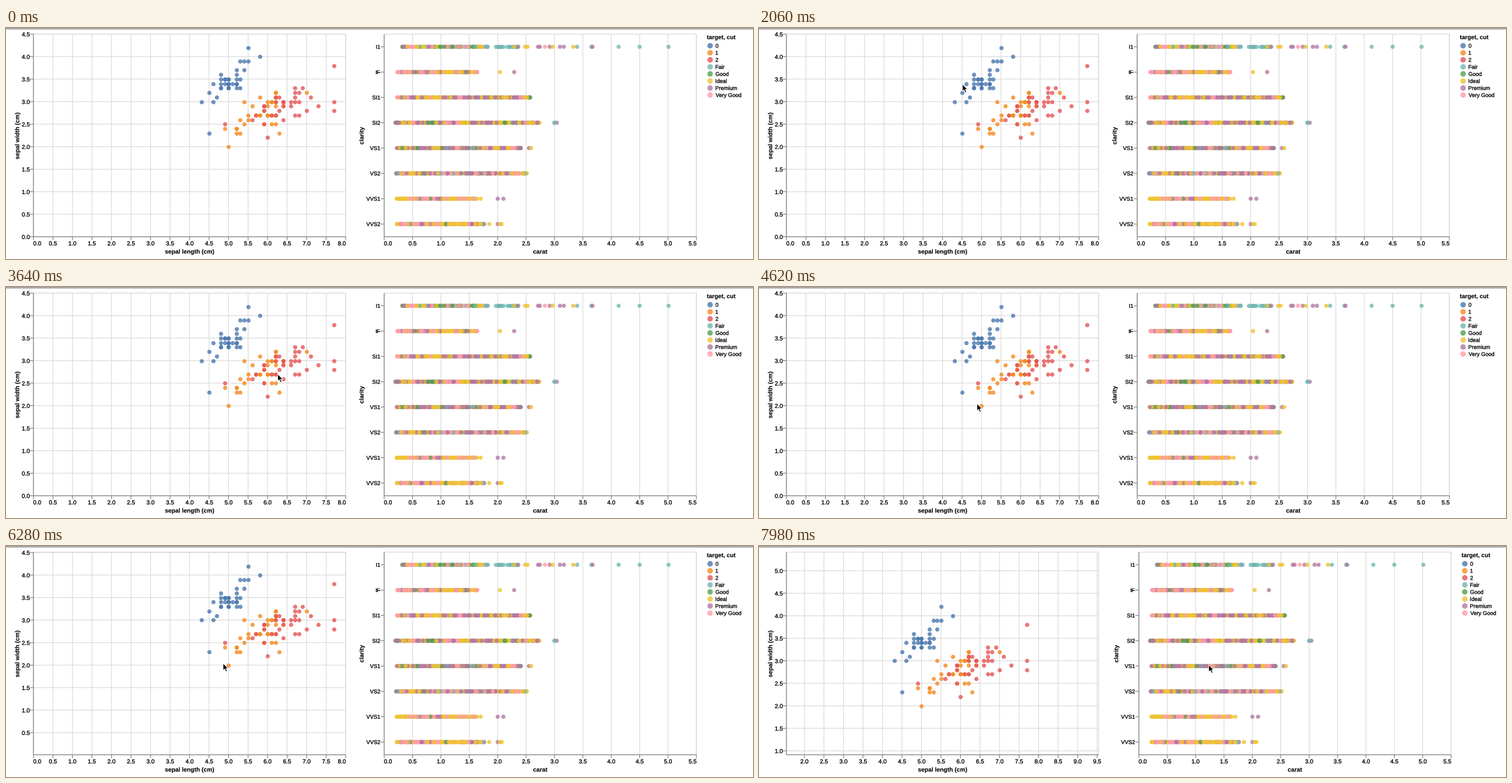
A matplotlib script for the animation above (8000 ms loop, 1280x397 px).

```python
import numpy as np
import matplotlib.pyplot as plt
from matplotlib.animation import FuncAnimation
from matplotlib.collections import LineCollection
from matplotlib.patches import PathPatch, Polygon, Rectangle
from matplotlib.textpath import TextPath
from matplotlib.transforms import Affine2D

W, H, DPI = 1280, 397, 100
LOOP, STEP = 8000, 40
FRAMES = LOOP // STEP
PX = 72 / DPI                      # one pixel in points
TOP, BOTTOM = 10.5, 358.7
L, R = 47, 582                     # left chart
L2, R2 = 648, 1183                 # right chart
UX, UY, UC = (R - L) / 8, (BOTTOM - TOP) / 4.5, (R2 - L2) / 5.5
GRID, AXIS = "#dcdcdc", "#888888"
ALPHA = 0.8

CUTS = {"Fair": "#72b7b2", "Good": "#54a24b", "Ideal": "#eec432",
        "Premium": "#b279a2", "Very Good": "#ff9da6"}
CUT_COLORS = list(CUTS.values())
INITIALS = {name[0]: color for name, color in CUTS.items()}

# species: colour, size, mean, spread, correlation, outer points
SPECIES = [
    ("#4a78ae", 30, (5.0, 3.38), (0.27, 0.28), 0.75,
     [(5.5, 4.2), (5.8, 4.0), (5.4, 3.9), (4.5, 2.3), (4.3, 3.0)]),
    ("#f58a1f", 34, (5.9, 2.77), (0.42, 0.25), 0.55,
     [(7.0, 3.2), (5.0, 2.0), (4.9, 2.4), (6.3, 2.3)]),
    ("#e55557", 30, (6.5, 2.95), (0.5, 0.22), 0.45,
     [(7.7, 3.8), (7.7, 2.8), (7.7, 3.0), (6.0, 2.2), (4.9, 2.5)]),
]

# share of each cut in a row, by quality
ROUGH = (0.26, 0.16, 0.18, 0.24, 0.16)
MIXED = (0.04, 0.08, 0.33, 0.33, 0.22)
PURE = (0.02, 0.05, 0.45, 0.18, 0.30)

# clarity: range, shares, lone carats and the initials of their cuts
ROWS = {
    "I1": (0.30, 1.83, ROUGH, (3.4, 3.65, 3.67, 4.13, 4.5, 5.01), "FFPFFF"),
    "IF": (0.23, 1.65, PURE, (2.04, 2.29), "IP"),
    "SI1": (0.22, 2.57, MIXED, (), ""),
    "SI2": (0.20, 2.74, MIXED, (3.04, 3.0, 3.0), "PFF"),
    "VS1": (0.22, 2.42, MIXED, (2.55, 2.59), "PI"),
    "VS2": (0.20, 2.51, MIXED, (), ""),
    "VVS1": (0.22, 1.63, PURE, (1.7, 2.0, 2.1), "IPP"),
    "VVS2": (0.22, 1.76, PURE, (1.85, 2.0, 2.07, 2.04), "IPII"),
}

# pointer moves: start and end time, where to
START = np.array([905, 352])
MOVES = [(100, 840, 730, 204), (980, 1100, 744, 232),
         (1660, 2060, 348.5, 96.5), (2100, 2380, 300, 90),
         (2480, 3640, 465.5, 149.5), (3660, 4060, 440, 124),
         (4160, 4620, 373.5, 200.5), (5000, 5100, 372, 200.7),
         (5100, 5440, 372, 201.5), (6310, 6580, 269.1, 271.4),
         (6680, 7280, 375.5, 198), (7320, 7980, 770.5, 204)]
PRESS, RELEASE = 5100, 6580


def pointer(t):
    pos, here = START + np.zeros((len(t), 2)), START
    for begin, end, x, y in MOVES:
        s = np.clip((t - begin) / (end - begin), 0, 1)
        pos += np.outer(s * s * (3 - 2 * s), (x, y) - here)
        here = np.array([x, y])
    return pos


times = np.arange(FRAMES) * STEP + STEP / 2
cursor_at = pointer(times)
pan_at = (pointer(np.clip(times, PRESS, RELEASE))
          - pointer(np.array([PRESS])))

fig = plt.figure(figsize=(W / DPI, H / DPI), dpi=DPI, facecolor="white")
ax = fig.add_axes([0, 0, 1, 1])
ax.set_xlim(0, W)
ax.set_ylim(H, 0)
ax.axis("off")

pan = Affine2D()                   # moves the left points
side = Affine2D()                  # moves the right chart and legend
still = Affine2D()


def label(s, x, y, size=10, ha="center", bold=False, rot=0, group=still):
    """Text centred vertically on y; returns its patch and its position."""
    path = TextPath((0, 0), s, size=size, prop=dict(
        family="Liberation Sans", weight="bold" if bold else "normal"))
    box = path.get_extents()
    anchor = {"left": box.x0, "right": box.x1,
              "center": (box.x0 + box.x1) / 2}[ha]
    place = Affine2D().translate(-anchor, -0.36 * size).scale(1, -1)
    pos = Affine2D().translate(x, y)
    patch = PathPatch(place.rotate_deg(rot).transform_path(path), fc="black",
                      ec="black", lw=(0.1 if bold else 0.35) * PX,
                      transform=pos + group + ax.transData, zorder=5)
    ax.add_artist(patch)
    return patch, pos


def lines(segments, color, zorder, group=still):
    lc = LineCollection(segments, colors=color, linewidths=1.3 * PX,
                        zorder=zorder, transform=group + ax.transData)
    lc.set_snap(False)
    ax.add_collection(lc, autolim=False)
    return lc


def dots(x, y, colors, r=3.6, group=still):
    ax.scatter(x, y, s=(2 * r * PX) ** 2, c=colors, alpha=ALPHA, linewidths=0,
               zorder=3, transform=group + ax.transData)


def frame(x0, x1, group=still):
    ax.add_artist(Rectangle((x0, TOP), x1 - x0, BOTTOM - TOP, fc="none",
                            ec=GRID, lw=1.3 * PX, snap=False, zorder=1,
                            transform=group + ax.transData))
    lines([[(x0, TOP), (x0, BOTTOM)], [(x0, BOTTOM), (x1, BOTTOM)]], AXIS, 4,
          group)


def flush(x, x0, x1):
    """Keep labels at the very ends of an axis inside it."""
    return x + 6.5 * (abs(x - x0) < 1) - 6.5 * (abs(x - x1) < 1)


def vline(x):
    return [(x, TOP), (x, BOTTOM)]


def xtick(x):
    return [(x, BOTTOM), (x, BOTTOM + 6)]


def ytick(x0, y):
    return [(x0 - 6, y), (x0, y)]


ax.plot([0, W], [0.5, 0.5], color="#3c3c3c", lw=PX)

# left chart
frame(L, R)
grid = lines([], GRID, 1)
ticks = lines([], AXIS, 4)
xvals, yvals = np.arange(0, 10, 0.5), np.arange(0, 5.5, 0.5)
xlabels = [label(f"{v:.1f}", 0, 0) for v in xvals]
ylabels = [label(f"{v:.1f}", 0, 0, ha="right") for v in yvals]
label("sepal length (cm)", 314.5, 384, 10.3, bold=True)
label("sepal width (cm)", 19, 185.5, 10.3, bold=True, rot=-90)

rng = np.random.default_rng(12)
for color, n, mean, sd, corr, outer in SPECIES:
    u, v = np.clip(rng.normal(size=(2, n)), -1.7, 1.7)
    v = corr * u + np.sqrt(1 - corr ** 2) * v
    cloud = np.round(np.column_stack([u, v]) * sd + mean, 1)
    x, y = np.vstack([cloud, outer]).T
    dots(L + UX * x, BOTTOM - UY * y, color, group=pan)

# right chart
frame(L2, R2, side)
carats = np.arange(0, 6, 0.5)
cx = L2 + UC * carats
lines([vline(x) for x in cx], GRID, 1, side)
lines([xtick(x) for x in cx], AXIS, 4, side)
for v, x in zip(carats, cx):
    label(f"{v:.1f}", flush(x, L2, R2), 370, group=side)
label("carat", 915.5, 384, 10.3, bold=True, group=side)
label("clarity", 609, 185, 10.3, bold=True, rot=-90, group=side)


def gems(y, carat, colors):
    dots(L2 + UC * np.array(carat), np.full(len(carat), y), colors, group=side)


row_h = (BOTTOM - TOP) / len(ROWS)
for k, (name, (lo, hi, share, lone, cuts)) in enumerate(ROWS.items()):
    y = TOP + row_h * (k + 0.5)
    label(name, L2 - 7, y, 9.4, "right", group=side)
    lines([ytick(L2, y)], AXIS, 4, side)
    n = int((hi - lo) * (60 if name == "I1" else 90))
    spread = np.clip(np.linspace(lo, hi, n) + rng.normal(0, 0.015, n), lo, hi)
    # neighbours often share a cut
    picks = np.repeat(rng.choice(5, n, p=share), rng.integers(1, 4, n))[:n]
    order = rng.permutation(n)
    gems(y, spread[order], [CUT_COLORS[c] for c in picks[order]])
    if name == "I1":
        gems(y, rng.uniform(1.95, 2.35, 20), CUT_COLORS[0])
        gems(y, np.linspace(2.3, 3.24, 12) + rng.normal(0, 0.05, 12),
             [CUT_COLORS[c] for c in rng.integers(2, 5, 12)])
    if lone:
        gems(y, lone, [INITIALS[c] for c in cuts])

# legend
label("target, cut", 1201, 15.5, 10.2, "left", bold=True, group=side)
names = ["0", "1", "2", *CUTS]
rows = 30.5 + 12.1 * np.arange(len(names))
dots([1206.5] * len(names), rows, [s[0] for s in SPECIES] + CUT_COLORS, 4.7,
     side)
for name, y in zip(names, rows):
    label(name, 1216, y, 9.4, "left", group=side)

ARROW = np.array([(0, 0), (0, 12.4), (2.8, 9.8), (4.9, 14.6), (7, 13.7),
                  (5, 9), (8.8, 9)])
cursor = Polygon(ARROW, closed=True, fc="black", ec="white", lw=0.9 * PX,
                 zorder=9)
ax.add_artist(cursor)


def inside(v, a, b):
    return a - 0.01 <= v <= b + 0.01


def update(i):
    dx, dy = pan_at[i]
    pan.clear().translate(dx, dy)
    grid_segs, tick_segs, last = [], [], L
    for v, (patch, pos) in zip(xvals, xlabels):
        x = L + UX * v + dx
        patch.set_visible(inside(x, L, R))
        if patch.get_visible():
            last = flush(x, L, R)
            pos.clear().translate(last, 370)
            grid_segs.append(vline(x))
            tick_segs.append(xtick(x))
    for v, (patch, pos) in zip(yvals, ylabels):
        y = BOTTOM - UY * v + dy
        patch.set_visible(inside(y, TOP, BOTTOM))
        if patch.get_visible():
            pos.clear().translate(L - 6.5, y + 0.3)
            grid_segs.append([(L, y), (R, y)])
            tick_segs.append(ytick(L, y))
    grid.set_segments(grid_segs)
    ticks.set_segments(tick_segs)
    # an overhanging last label pushes the right chart along
    side.clear().translate(max(0, last + 7.5 - 584), 0)
    cursor.set_visible(times[i] >= MOVES[0][0])
    cursor.set_xy(ARROW + cursor_at[i])
    return []


anim = FuncAnimation(fig, update, frames=FRAMES, interval=STEP, repeat=True,
                     repeat_delay=0, blit=False)
plt.show()
```
